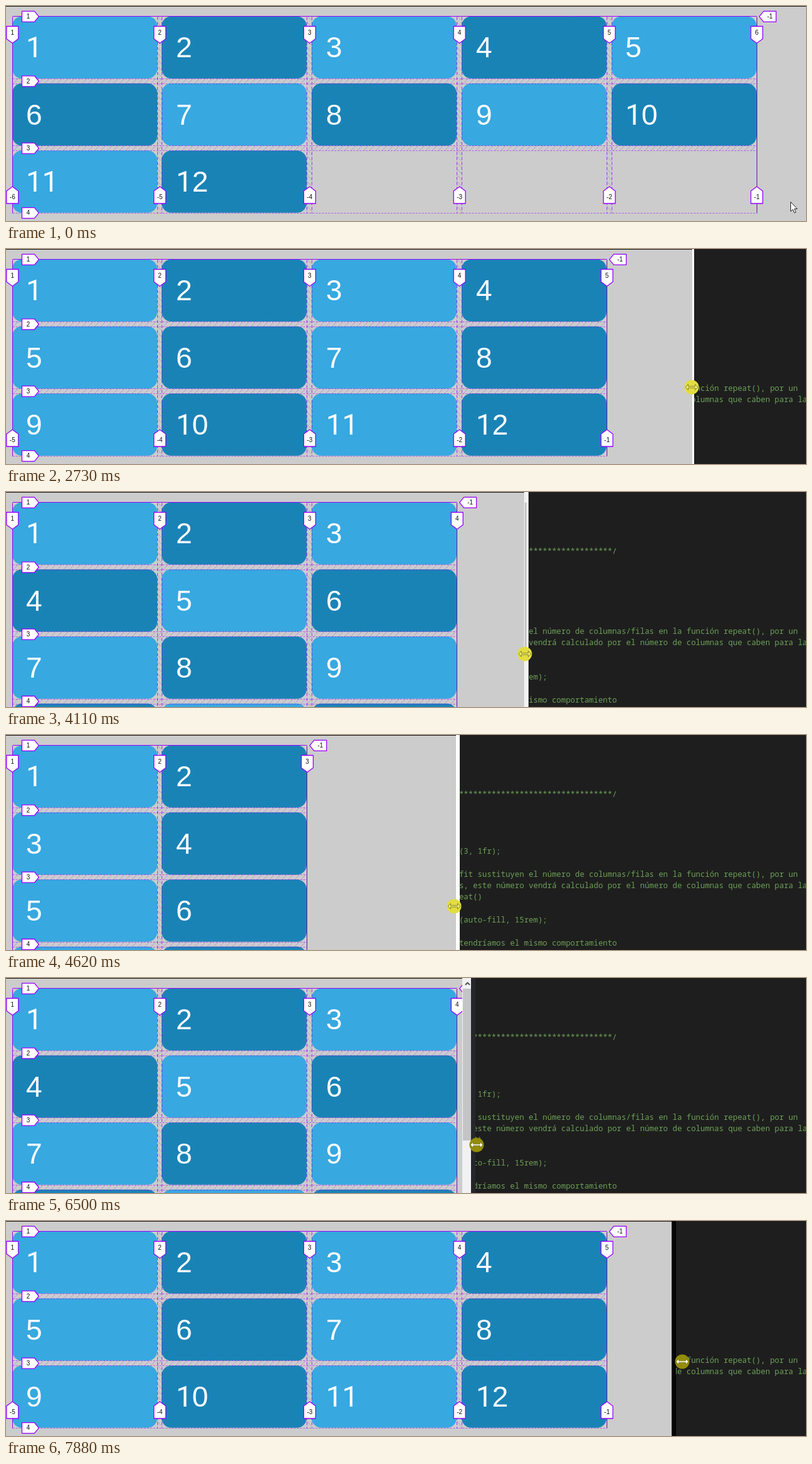
Write an HTML page with a canvas that moves like this. It is 1280 px wide and 344 px high and loops after 8 s.

```html
<!DOCTYPE html>
<html lang="es">
<head>
<meta charset="utf-8">
<title>Grid auto-fill</title>
<style>
html, body { margin: 0; width: 100%; height: 100%; overflow: hidden; background: #ccc; }
canvas { display: block; }
</style>
</head>
<body>
<canvas id="stage" width="1280" height="344"></canvas>
<script>
const ctx = document.getElementById('stage').getContext('2d');
const W = 1280, H = 344, LOOP = 8000;
const LEFT = 9.67, TOP = 16.5, CELL_W = 232, CELL_H = 99.6, COL = 239.75, ROW = 107.35, ITEMS = 12;
const PURPLE = '#9400ff', GREEN = '#6da058', PLAIN = '#e4e4e4';
const MOVE_START = 1515, STEP = 171.5;

// step, scrollbar x, divider left, divider right, cursor x, cursor y
const KEYS = [
  [0, 1272, 1272, 1276, 1270, 196],
  [3, 1214, 1214, 1218, 1213, 205],
  [5, 1161, 1161, 1165, 1161, 212],
  [11, 964, 972, 972, 970, 239],
  [12, 938, 946, 946, 942, 243],
  [18, 720, 720, 726, 717, 274],
  [19, 715, 715, 721, 714, 275],
  [25, 604, 615, 620, 615, 287],
  [26, 598, 609, 614, 609, 287],
  [32, 861, 878, 888, 896, 247],
  [33, 893, 910, 919, 927, 244],
  [37, 1065, 1065, 1072, 1082, 225]
];
const TURN = 26;

// line number, column offset, text
const CODE_X = 725, CHAR = 7.43, LINE_H = 18.3;
const CODE = [
  [4, -24, '*'.repeat(57) + '/'],
  [9, -15, 'columns: repeat(3, 1fr);'],
  [11, -17, 'auto-fill y auto-fit sustituyen el número de columnas/filas en la función repeat(), por un'],
  [12, -20, 'calculado de columnas, este número vendrá calculado por el número de columnas que caben para la'],
  [13, -17, 'de la función repeat()'],
  [15, -15, 'columns: repeat(auto-fill, 15rem);'],
  [17, -16, 'En este ejemplo tendríamos el mismo comportamiento']
];

function pose(step) {
  const i = Math.max(1, KEYS.findIndex(k => k[0] >= step));
  const a = KEYS[i - 1], b = KEYS[i];
  const f = (step - a[0]) / (b[0] - a[0]);
  return a.map((v, j) => Math.round(v + (b[j] - v) * f)).slice(1);
}

function rect(x, y, w, h, color) {
  ctx.fillStyle = color;
  ctx.fillRect(x, y, w, h);
}

function shape(points, fill, stroke) {
  ctx.beginPath();
  points.forEach(([x, y]) => ctx.lineTo(x, y));
  ctx.closePath();
  ctx.fillStyle = fill;
  ctx.fill();
  ctx.strokeStyle = stroke;
  ctx.stroke();
}

function line(x1, y1, x2, y2, dash = []) {
  const snap = v => Math.round(v) + 0.5;
  ctx.setLineDash(dash);
  ctx.beginPath();
  ctx.moveTo(snap(x1), snap(y1));
  ctx.lineTo(snap(x2), snap(y2));
  ctx.stroke();
  ctx.setLineDash([]);
}

function hatch(x, y, w, h, slant) {
  ctx.save();
  ctx.beginPath();
  ctx.rect(x, y, w, h);
  ctx.clip();
  ctx.globalAlpha = 0.3;
  ctx.beginPath();
  const reach = h + 10;
  for (let s = x - reach; s < x + w + reach; s += 10) {
    ctx.moveTo(s, y + h);
    ctx.lineTo(s + slant * h, y);
  }
  ctx.stroke();
  ctx.restore();
}

// A tag whose tip sits at (x, y) and points along the given quarter turn.
function tag(text, x, y, turn, len, half) {
  const [c, s] = [[1, 0], [0, 1], [-1, 0], [0, -1]][turn];
  const at = (along, across) => [x - along * c - across * s, y - along * s + across * c];
  ctx.lineJoin = 'round';
  ctx.lineWidth = 1.3;
  shape([at(0, 0), at(7, -half), at(len, -half), at(len, half), at(7, half)], '#fff', PURPLE);
  ctx.lineWidth = 1;
  ctx.font = '10px "Liberation Sans", Arial, sans-serif';
  ctx.textAlign = 'center';
  ctx.textBaseline = 'middle';
  const [tx, ty] = at(17, 0);
  ctx.fillStyle = '#111';
  ctx.fillText(text, tx, ty + 0.5);
}

// Roboto supplies the "1", which has no foot there.
function drawNumber(n, x, y) {
  ctx.fillStyle = '#fff';
  for (const digit of String(n)) {
    ctx.font = `46.4px ${digit === '1' ? 'Roboto' : '"Liberation Sans"'}, Arial, sans-serif`;
    ctx.fillText(digit, x, y);
    x += 25.8;
  }
}

function drawCells(cols) {
  ctx.textAlign = 'left';
  ctx.textBaseline = 'alphabetic';
  for (let i = 0; i < ITEMS; i++) {
    const x = LEFT + i % cols * COL, y = TOP + Math.floor(i / cols) * ROW;
    ctx.fillStyle = i % 2 ? '#1a83b6' : '#37a8e0';
    ctx.beginPath();
    ctx.roundRect(Math.round(x), y, CELL_W, CELL_H, 15.5);
    ctx.fill();
    drawNumber(i + 1, Math.floor(x + 23.2), Math.ceil(y + 65.2));
  }
}

function drawOverlay(cols) {
  const rows = Math.ceil(ITEMS / cols);
  const right = LEFT + (cols - 1) * COL + CELL_W;
  const bottom = TOP + (rows - 1) * ROW + CELL_H;
  const gapX = COL - CELL_W, gapY = ROW - CELL_H;
  const low = Math.min(bottom, H);
  ctx.strokeStyle = PURPLE;
  ctx.lineWidth = 1;

  for (let r = 1; r < rows; r++) {
    const y = TOP + r * ROW;
    hatch(LEFT, y - gapY, right - LEFT, gapY, 1);
    ctx.globalAlpha = 0.55;
    line(LEFT, y - gapY, right, y - gapY, [3, 2]);
    line(LEFT, y, right, y, [3, 2]);
    ctx.globalAlpha = 1;
  }
  for (let c = 1; c < cols; c++) {
    const x = LEFT + c * COL;
    for (let y = TOP; y < low; y += ROW) hatch(x - gapX, y, gapX, CELL_H, -1);
    ctx.globalAlpha = 0.75;
    line(x - gapX, TOP, x - gapX, low, [5, 3]);
    line(x, TOP, x, low, [5, 3]);
    ctx.globalAlpha = 1;
  }
  ctx.globalAlpha = 0.55;
  line(LEFT, bottom, right, bottom, [3, 2]);
  ctx.globalAlpha = 1;
  line(LEFT, TOP - 0.5, right, TOP - 0.5);
  line(LEFT, TOP, LEFT, low);
  ctx.strokeStyle = '#6412a8';
  line(right, TOP, right, low);

  for (let r = 0; r <= rows; r++) {
    const y = r === 0 ? TOP : r === rows ? bottom : TOP + r * ROW - gapY / 2;
    tag(r + 1, 52.5, y + 0.3, 0, 27, 8.5);
  }
  tag(-1, right + 4.5, TOP + 0.3, 2, 27, 8.5);
  for (let c = 0; c <= cols; c++) {
    const x = c === 0 ? LEFT : c === cols ? right : LEFT + c * COL - gapX / 2;
    tag(c + 1, x + 0.6, 59.5, 1, 27, 9.5);
    if (bottom < H) tag(c - cols - 1, x + 0.6, 289, 3, 27, 9.5);
  }
}

function drawScrollbar(x, rows) {
  rect(x, 0, 17, H, '#f1f1f1');
  rect(x + 1, 17, 15, rows > 4 ? 159 : 243, '#c4c4c4');
  ctx.strokeStyle = '#505050';
  ctx.lineWidth = 2;
  ctx.beginPath();
  ctx.moveTo(x + 5, 11);
  ctx.lineTo(x + 8.5, 7.5);
  ctx.lineTo(x + 12, 11);
  ctx.stroke();
}

function drawEditor(x) {
  ctx.save();
  ctx.beginPath();
  ctx.rect(x, 0, W - x, H);
  ctx.clip();
  rect(x, 0, W - x, H, '#1e1e1e');
  ctx.font = '12.38px "Noto Sans Mono", monospace';
  ctx.textAlign = 'left';
  ctx.textBaseline = 'alphabetic';
  const put = (text, px, row, color) => {
    ctx.fillStyle = color;
    ctx.fillText(text, px, 25.5 + row * LINE_H);
  };
  CODE.forEach(([row, col, text]) => put(text, CODE_X + col * CHAR, row, GREEN));
  put('n + 1) {', CODE_X - 14 * CHAR, 0, PLAIN);
  rect(623, 34, 10, 10, '#eee');
  rect(624, 35, 8, 8, '#268a9c');
  put('#37A8E0', 635, 1, '#d7b070');
  put(';', 635 + 7 * CHAR, 1, PLAIN);
  ctx.restore();
}

function drawResizer(x, y, leftward) {
  ctx.beginPath();
  ctx.arc(x, y, 11.5, 0, 7);
  ctx.fillStyle = leftward ? '#e2dd40' : '#938d08';
  ctx.fill();
  const half = [[-10, 0], [-5.5, -4.5], [-5.5, -1.2], [5.5, -1.2], [5.5, -4.5], [10, 0]];
  const points = half.concat(half.slice(1, 5).reverse().map(([a, b]) => [a, -b]));
  ctx.lineWidth = 0.8;
  shape(points.map(([a, b]) => [x + a, y + b]), leftward ? '#eeea70' : '#fff', leftward ? '#6e6a18' : '#77720a');
}

function drawPointer(x, y) {
  const points = [[0, 0], [0, 15], [3.5, 12], [6, 17.5], [8.3, 16.5], [6, 11], [10.5, 11]];
  ctx.lineWidth = 1;
  shape(points.map(([a, b]) => [x + a + 0.5, y + b + 0.5]), '#fff', '#222');
}

function draw(t) {
  const step = Math.min(37, Math.floor((t - MOVE_START) / STEP));
  const moving = step >= 0;
  const [bar, from, to, cx, cy] = moving ? pose(step) : [W, W, W, 0, 0];
  // The overlay reacts to a new width slightly before the cells do.
  const fit = inset => Math.min(5, Math.floor((to - inset) / COL));
  const cols = fit(15), rows = Math.ceil(ITEMS / cols);

  rect(0, 0, W, H, '#ccc');
  drawCells(cols);
  drawOverlay(fit(20));
  rect(0, 0, W, 1, '#111');
  if (moving) {
    const leftward = step <= TURN;
    if (rows > 3 && from > bar) drawScrollbar(bar, rows);
    rect(from, 0, to - from, H, leftward ? '#fff' : step > 33 ? '#050505' : '#26272c');
    drawEditor(to);
    drawResizer(cx, cy, leftward);
  } else if (t < 170) {
    drawPointer(1255, 313);
  }
}

const start = performance.now();
function tick() {
  draw((performance.now() - start) % LOOP);
  requestAnimationFrame(tick);
}
tick();
</script>
</body>
</html>
```
